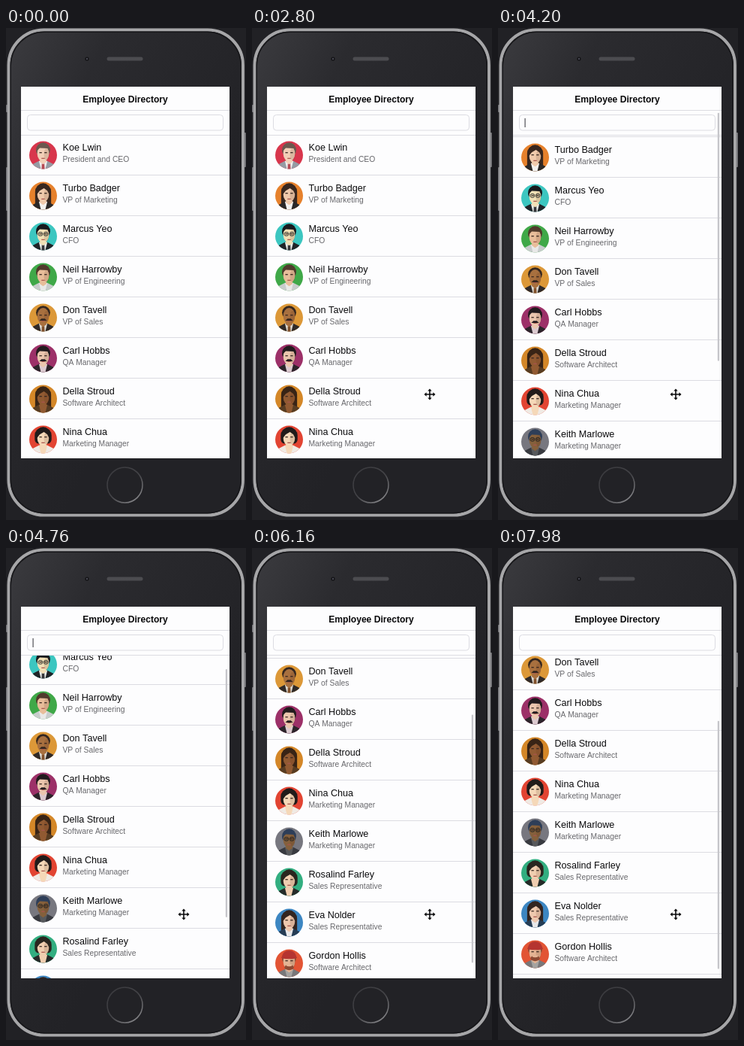
Animation of 320 by 654 pixels, one loop 8 s. Source, as an HTML page with a canvas:

```html
<!DOCTYPE html>
<html lang="en">
<head>
<meta charset="utf-8">
<title>Employee Directory</title>
<style>
html, body { margin: 0; width: 100%; height: 100%; overflow: hidden; background: #212125; }
canvas { display: block; width: 320px; height: 654px; }
</style>
</head>
<body>
<canvas id="stage"></canvas>
<script>
const W = 320, H = 654, LOOP = 8000, ROW = 54, MAX_SCROLL = 223;
const FONT = '"Liberation Sans", Arial, sans-serif';
const LINE = '#dcdce2', PAPER = '#fdfdfe';
const SCREEN = { x: 20, y: 78, w: 278, h: 494 };

const canvas = document.getElementById('stage');
const ctx = canvas.getContext('2d');
const dpr = window.devicePixelRatio || 1;
canvas.width = W * dpr;
canvas.height = H * dpr;

const person = (name, role, look) => ({ name, role, look });
const people = [
  person('Koe Lwin', 'President and CEO',
    { bg: '#d8364c', skin: '#f2d0b8', hair: '#6b584e', coat: '#959ba3', shirt: '#f0eff0', tie: '#b64b55' }),
  person('Turbo Badger', 'VP of Marketing',
    { bg: '#e6812c', skin: '#f0caac', hair: '#38271f', coat: '#2a2828', shirt: '#f4f2f0', long: 1 }),
  person('Marcus Yeo', 'CFO',
    { bg: '#3cc6c0', skin: '#f1e0b6', hair: '#181a1e', coat: '#202428', shirt: '#e8ece8', tie: '#36363a', glasses: 1 }),
  person('Neil Harrowby', 'VP of Engineering',
    { bg: '#3fa848', skin: '#e8bd9a', hair: '#503a2c', coat: '#c8cccc', shirt: '#e9e9e8' }),
  person('Don Tavell', 'VP of Sales',
    { bg: '#dc9838', skin: '#a8703f', hair: '#34261f', coat: '#302a28', shirt: '#dcd8d0', tie: '#81512c', moustache: 1, thin: 1 }),
  person('Carl Hobbs', 'QA Manager',
    { bg: '#9c3068', skin: '#ebc6ae', hair: '#221b1e', coat: '#2c242a', shirt: '#dccad0', moustache: 1 }),
  person('Della Stroud', 'Software Architect',
    { bg: '#d48728', skin: '#915a32', hair: '#382416', coat: '#573c22', shirt: '#915a32', long: 1 }),
  person('Nina Chua', 'Marketing Manager',
    { bg: '#e24432', skin: '#f5d8b8', hair: '#211b1a', coat: '#f0eae4', shirt: '#f5d8b8', bob: 1 }),
  person('Keith Marlowe', 'Marketing Manager',
    { bg: '#77777f', skin: '#85603c', hair: '#2e3e58', coat: '#383a40', shirt: '#57595c', glasses: 1 }),
  person('Rosalind Farley', 'Sales Representative',
    { bg: '#32ae80', skin: '#f0ceb0', hair: '#29261f', coat: '#252a28', shirt: '#f0ceb0', bob: 1 }),
  person('Eva Nolder', 'Sales Representative',
    { bg: '#3c86c2', skin: '#eec8ae', hair: '#332520', coat: '#253c54', shirt: '#e8e8ea', long: 1 }),
  person('Gordon Hollis', 'Software Architect',
    { bg: '#e25434', skin: '#e4b494', hair: '#8d4b34', coat: '#78787a', shirt: '#a5a3a0', cap: '#b53430', beard: 1 })
];

function rounded(x, y, w, h, r) {
  ctx.beginPath();
  ctx.roundRect(x, y, w, h, r);
}

function fillRound(color, x, y, w, h, r) {
  ctx.fillStyle = color;
  rounded(x, y, w, h, r);
  ctx.fill();
}

function oval(color, x, y, rx, ry) {
  ctx.fillStyle = color;
  ctx.beginPath();
  ctx.ellipse(x, y, rx, ry, 0, 0, 7);
  ctx.fill();
}

function poly(color, ...pts) {
  ctx.fillStyle = color;
  ctx.beginPath();
  for (let i = 0; i < pts.length; i += 2) ctx.lineTo(pts[i], pts[i + 1]);
  ctx.fill();
}

function text(str, x, y, font, color, align = 'left') {
  ctx.font = `${font} ${FONT}`;
  ctx.fillStyle = color;
  ctx.textAlign = align;
  ctx.fillText(str, x, y);
}

function hairline(y) {
  ctx.fillStyle = LINE;
  ctx.fillRect(SCREEN.x, y, SCREEN.w, 1);
}

// Smooth curve through [step, value] keys, flat at both ends.
function follow(keys, t) {
  const last = keys.length - 1;
  if (t <= keys[0][0]) return keys[0][1];
  if (t >= keys[last][0]) return keys[last][1];
  const i = keys.findIndex(k => k[0] > t) - 1;
  const slope = n => n <= 0 || n >= last ? 0
    : (keys[n + 1][1] - keys[n - 1][1]) / (keys[n + 1][0] - keys[n - 1][0]);
  const [t0, a] = keys[i], [t1, b] = keys[i + 1];
  const d = t1 - t0, u = (t - t0) / d, v = 1 - u;
  return a * v * v * (1 + 2 * u) + b * u * u * (3 - 2 * u)
    + d * u * v * (slope(i) * v - slope(i + 1) * u);
}

// Playback is uneven: every 140 ms holds three steps of 100, 20 and 20 ms.
function stepAt(ms) {
  const rest = ms % 140;
  return 3 * Math.floor(ms / 140) + (rest >= 100) + (rest >= 120);
}

// One flick that decays, overshoots the end and settles back.
const SCROLL_START = 77, POINTER_START = 45;
const scrollKeys = [[SCROLL_START, 0], [90, 51], [102, 122], [117, 172],
  [130, 206], [139, 226], [146, 233], [162, 226], [171, 223]];
const pointerX = [[42, 330], [POINTER_START, 304], [56, 237]];
const pointerY = [[42, 556], [POINTER_START, 536], [56, 487]];

function drawPhone() {
  ctx.fillStyle = '#212125';
  ctx.fillRect(0, 0, W, H);
  for (const [x, y, h] of [[0, 102, 10], [0, 185, 58], [316, 139, 46]])
    fillRound('#727276', x, y, 4, h, 1);

  const body = ctx.createLinearGradient(0, 0, W, 160);
  body.addColorStop(0, '#3c3c40');
  body.addColorStop(0.35, '#2b2b2f');
  body.addColorStop(1, '#222226');
  rounded(3.5, 2.5, 312.5, 645, 47);
  ctx.fillStyle = body;
  ctx.fill();
  ctx.strokeStyle = '#a6a6a8';
  ctx.lineWidth = 4;
  ctx.stroke();
  rounded(6.2, 5.2, 307.1, 639.6, 45);
  ctx.strokeStyle = '#17171a';
  ctx.lineWidth = 1.4;
  ctx.stroke();

  oval('#131316', 108, 41, 2.6, 2.6);
  oval('#4a4a54', 108, 41, 1.2, 1.2);
  fillRound('#4c4c50', 134.5, 38.5, 48, 5, 2.5);

  const rim = ctx.createLinearGradient(142, 590, 174, 630);
  rim.addColorStop(0, '#3c3c40');
  rim.addColorStop(0.5, '#444448');
  rim.addColorStop(1, '#8a8a8d');
  ctx.strokeStyle = rim;
  ctx.lineWidth = 1.5;
  ctx.beginPath();
  ctx.arc(158.5, 607.5, 23.5, 0, 7);
  ctx.stroke();
}

function drawAvatar(look, cx, cy) {
  const { bg, skin, hair, coat, shirt } = look;
  ctx.save();
  ctx.translate(cx, cy);
  ctx.beginPath();
  ctx.arc(0, 0, 18.5, 0, 7);
  ctx.clip();
  ctx.fillStyle = bg;
  ctx.fillRect(-19, -19, 38, 38);
  ctx.scale(1.12, 1.12);

  if (look.long) fillRound(hair, -9.5, -14, 19, 28, [9, 9, 4, 4]);
  if (look.bob) fillRound(hair, -10, -14, 20, 19, [9, 9, 5, 5]);
  poly(coat, -18, 20, -15, 12, -5, 7, 5, 7, 15, 12, 18, 20);
  poly(shirt, -5, 7, 5, 7, 2, 19, -2, 19);
  if (look.tie) poly(look.tie, -1.5, 10, 1.5, 10, 2, 19, -2, 19);
  poly(skin, -3.5, 3, 3.5, 3, 4, 8, 0, 11, -4, 8);

  oval(hair, 0, -6, 8.4, look.thin ? 8 : 9);
  oval(skin, 0, -2, 7, 9.5);
  oval('rgba(80,35,20,.14)', 4, -1, 3, 7);
  if (look.long || look.bob)
    poly(hair, -8, -1, -7, -10, -1, -13, 7, -10, 8, 0, 5, -6, 1, -9, -4, -6);
  else if (!look.thin)
    poly(hair, -8, -3, -7.5, -10, -2, -14, 5, -13, 8, -8, 7.5, -3, 5.5, -8, -4, -8.5, -6.5, -6);

  ctx.fillStyle = '#35251f';
  ctx.fillRect(-4.5, -3.5, 3, 1.1);
  ctx.fillRect(1.5, -3.5, 3, 1.1);
  ctx.fillStyle = '#a8544c';
  ctx.fillRect(-2, 3.3, 4, 1.1);
  if (look.moustache) poly(hair, -4.5, 3.5, -2, 1.2, 2, 1.2, 4.5, 3.5);
  if (look.beard) {
    oval(hair, 0, 4.8, 5.5, 3.4);
    oval(skin, 0, 2.2, 3.5, 1.5);
  }
  if (look.glasses) {
    ctx.strokeStyle = '#171c1f';
    ctx.lineWidth = 0.8;
    for (const x of [-5.6, 0.8]) {
      rounded(x, -4.8, 4.8, 4, 1.6);
      ctx.stroke();
    }
  }
  if (look.cap) {
    fillRound(look.cap, -8.5, -15, 17, 8.5, [8, 8, 1, 1]);
    oval(look.cap, 0, -7, 9.5, 1.9);
  }
  ctx.restore();
}

function drawList(scroll) {
  people.forEach((p, i) => {
    const y = 142 + i * ROW - scroll;
    if (y > 572 || y + ROW < 130) return;
    drawAvatar(p.look, 49.5, y + 27);
    text(p.name, 75.5, y + 20.5, '12.6px', '#0c0c0e');
    text(p.role, 75.5, y + 35.5, '10.3px', '#68686c');
    hairline(y + 53);
  });
}

function drawHeader(shift, caret) {
  ctx.save();
  ctx.translate(0, -shift);
  ctx.fillStyle = PAPER;
  ctx.fillRect(SCREEN.x, SCREEN.y, SCREEN.w, 65);
  text('Employee Directory', 159, 98.5, 'bold 12.1px', '#08080a', 'center');
  hairline(109);
  rounded(28.5, 115.5, 261, 20.5, 4);
  ctx.strokeStyle = LINE;
  ctx.lineWidth = 1;
  ctx.stroke();
  hairline(142);
  if (caret) {
    ctx.fillStyle = '#505056';
    ctx.fillRect(35.5, 120, 1.2, 12);
  }
  ctx.restore();
}

function drawPointer(x, y) {
  ctx.save();
  ctx.translate(x, y);
  const shaft = new Path2D('M-5 0H5M0 -5V5');
  const head = new Path2D('M0 -7.5L2.7 -4.4H-2.7Z');
  const pass = (color, shaftWidth, outline) => {
    ctx.strokeStyle = ctx.fillStyle = color;
    ctx.lineWidth = shaftWidth;
    ctx.stroke(shaft);
    ctx.lineWidth = outline;
    for (let i = 0; i < 4; i++) {
      ctx.rotate(Math.PI / 2);
      ctx.fill(head);
      if (outline) ctx.stroke(head);
    }
  };
  ctx.lineJoin = 'round';
  pass('#ffffff', 3.2, 1.6);
  pass('#08080a', 1.6, 0);
  ctx.restore();
}

function draw(step) {
  const scroll = follow(scrollKeys, step);
  const shift = Math.max(0, scroll - MAX_SCROLL) * 0.3;
  const blink = step % 60;

  ctx.setTransform(dpr, 0, 0, dpr, 0, 0);
  drawPhone();
  ctx.save();
  ctx.beginPath();
  ctx.rect(SCREEN.x, SCREEN.y, SCREEN.w, SCREEN.h);
  ctx.clip();
  ctx.fillStyle = PAPER;
  ctx.fillRect(SCREEN.x, SCREEN.y, SCREEN.w, SCREEN.h);
  drawList(Math.round(scroll));
  drawHeader(Math.round(shift), blink >= 17 && blink < 47);
  if (step > SCROLL_START)
    fillRound('#c6c6ca', 292.8, 78 + (scroll - shift) * 0.68, 2.2, 330, 1.1);
  ctx.restore();
  if (step >= POINTER_START) drawPointer(follow(pointerX, step), follow(pointerY, step));
}

const start = performance.now();
function tick() {
  draw(stepAt((performance.now() - start) % LOOP));
  requestAnimationFrame(tick);
}
tick();
</script>
</body>
</html>
```
